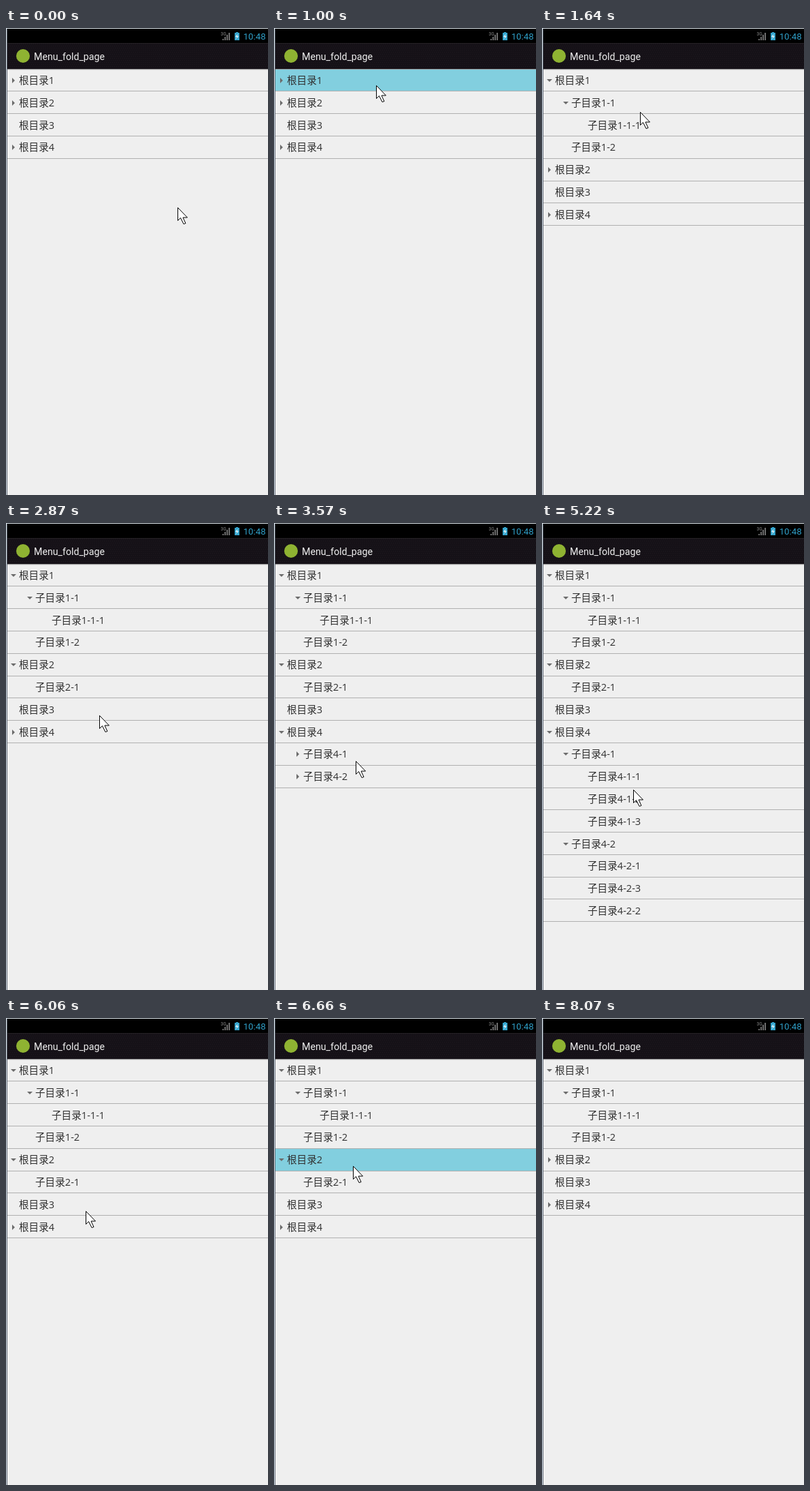
An HTML page with a canvas that plays this animation: 385x685 px, repeating every 8.17 s.

```html
<!DOCTYPE html>
<html lang="zh-CN">
<head>
<meta charset="utf-8">
<title>Tree list</title>
<style>
html, body { margin: 0; width: 100%; height: 100%; overflow: hidden; background: #efefef; }
canvas { display: block; }
</style>
</head>
<body>
<canvas id="stage" width="385" height="685"></canvas>
<script>
const ctx = document.getElementById('stage').getContext('2d');
const W = 385, H = 685, LOOP = 8170, POINTER_END = 8070;
const TOP = 60, ROW = 32.8, INDENT = 24, STEP = 100;
const LABEL_FONT = '14.6px "Open Sans", "Noto Sans CJK SC", "Noto Sans CJK", sans-serif';

const NODES = '1 1-1 1-1-1 1-2 2 2-1 3 4 4-1 4-1-1 4-1-2 4-1-3 4-2 4-2-1 4-2-3 4-2-2'.split(' ');

// Pointer stops; a stop with an id presses that branch and toggles it on leaving
const stop = (arrive, leave, x, y, id) => ({ arrive, leave, x, y, id });
const STOPS = [
  stop(0, 0, 252, 263),
  stop(1000, 1140, 150, 84, '1'),
  stop(1490, 1640, 144, 123, '1-1'),
  stop(2330, 2370, 132, 219, '2'),
  stop(2870, 2870, 137, 282),
  stop(3200, 3240, 134, 306, '4'),
  stop(3670, 3820, 120, 349, '4-1'),
  stop(4880, 5020, 130, 478, '4-2'),
  stop(5220, 5220, 134, 391),
  stop(5820, 5860, 118, 309, '4'),
  stop(6660, 6700, 116, 217, '2'),
  stop(7370, LOOP, 140, 142)
];
const BRANCHES = new Set(STOPS.map(s => s.id));

const isOpen = (id, t) => STOPS.filter(s => s.id === id && s.leave <= t).length % 2 === 1;
const isPressed = (id, t) => STOPS.some(s => s.id === id && s.arrive <= t && t < s.leave);

function isVisible(id, t) {
  const parent = id.slice(0, -2);
  return !parent || (isOpen(parent, t) && isVisible(parent, t));
}

function rect(x, y, w, h, color) {
  ctx.fillStyle = color;
  ctx.fillRect(x, y, w, h);
}

function poly(points, color) {
  ctx.beginPath();
  points.forEach(([x, y]) => ctx.lineTo(x, y));
  ctx.closePath();
  ctx.fillStyle = color;
  ctx.fill();
}

function text(str, x, y, font, color) {
  ctx.font = font;
  ctx.fillStyle = color;
  ctx.fillText(str, x, y);
}

function drawArrow(x, y, open) {
  const shape = open
    ? [[x - 3.5, y - 2], [x + 4.5, y - 2], [x + 0.5, y + 2]]
    : [[x - 1.5, y - 4], [x + 2.5, y], [x - 1.5, y + 4]];
  poly(shape, '#6c6c6c');
}

function drawRow(id, index, t) {
  const y = TOP + ROW * index;
  const top = Math.floor(y), bottom = Math.floor(y + ROW);
  const depth = id.split('-').length - 1;
  const x = depth * INDENT;
  if (isPressed(id, t)) rect(2, top + 1, W - 2, bottom - top - 1, '#82cfdf');
  if (BRANCHES.has(id)) drawArrow(x + 10.5, Math.round(y) + 17, isOpen(id, t));
  text((depth ? '子目录' : '根目录') + id, x + 19, Math.round(y + 22), LABEL_FONT, '#303030');
  rect(2, bottom, W - 2, 1, '#b0b0b0');
}

function drawStatus() {
  text('3G', 315.5, 11, '6.5px Roboto, sans-serif', '#8a8a8a');
  for (let i = 0; i < 4; i++) {
    const h = 2 + i * 3;
    rect(318 + i * 3, 18 - h, 2, h, '#6e6e6e');
  }
  rect(338, 6, 3, 1, '#35a5cd');
  rect(336, 7, 7, 11, '#35a5cd');
  poly([[340.5, 8.5], [337, 13], [339.2, 13], [338.2, 16.5], [342, 11.7], [339.7, 11.7]], '#e4f4fa');
  text('10:48', 348.7, 16.5, '13.2px Roboto, sans-serif', '#2f9fc8');
}

function drawHeader() {
  rect(0, 0, W, 1, '#dbe4ea');
  rect(2, 1, W - 2, 21, '#000');
  rect(2, 22, W - 2, 38, '#151117');
  for (let y = 23; y < 59; y += 3) {
    for (let x = 3 + y % 2; x < W; x += 3) rect(x, y, 1, 1, '#1f191f');
  }
  rect(2, 22, W - 2, 1, '#242024');
  rect(2, 60, W - 2, 1, '#9a9a9a');
  rect(2, 61, W - 2, 1, '#dcdcdc');

  ctx.beginPath();
  ctx.arc(25, 41, 10, 0, Math.PI * 2);
  ctx.fillStyle = '#8fb332';
  ctx.fill();
  text('Menu_fold_page', 41, 47, '14.2px Roboto, sans-serif', '#eeeeee');
}

// Moves in coarse steps, arriving one step before the next stop
function pointerAt(t) {
  const i = STOPS.findLastIndex(s => s.leave <= t);
  const from = STOPS[i], to = STOPS[i + 1];
  const count = Math.round((to.arrive - from.leave) / STEP) - 1;
  const k = Math.min(1, Math.floor((t - from.leave) / STEP) / Math.max(1, count));
  return [from.x + (to.x - from.x) * k, from.y + (to.y - from.y) * k].map(Math.round);
}

function drawPointer(t) {
  const [x, y] = pointerAt(t);
  ctx.save();
  ctx.translate(x + 0.5, y + 0.5);
  poly([[0, 0], [0, 19], [4, 15], [8.5, 24], [11.5, 23], [7.5, 14.5], [14, 14.5]], '#fff');
  ctx.strokeStyle = '#000';
  ctx.lineWidth = 1;
  ctx.stroke();
  ctx.restore();
}

function draw(t) {
  rect(0, 0, W, H, '#efefef');
  drawHeader();
  drawStatus();
  NODES.filter(id => isVisible(id, t)).forEach((id, i) => drawRow(id, i, t));
  rect(0, 0, 1, H, '#dbe4ea');
  rect(1, 1, 1, H, '#59626f');
  if (t < POINTER_END) drawPointer(t);
}

let began;
function tick(now) {
  began ??= now;
  draw((now - began) % LOOP);
  requestAnimationFrame(tick);
}
requestAnimationFrame(tick);
</script>
</body>
</html>
```
